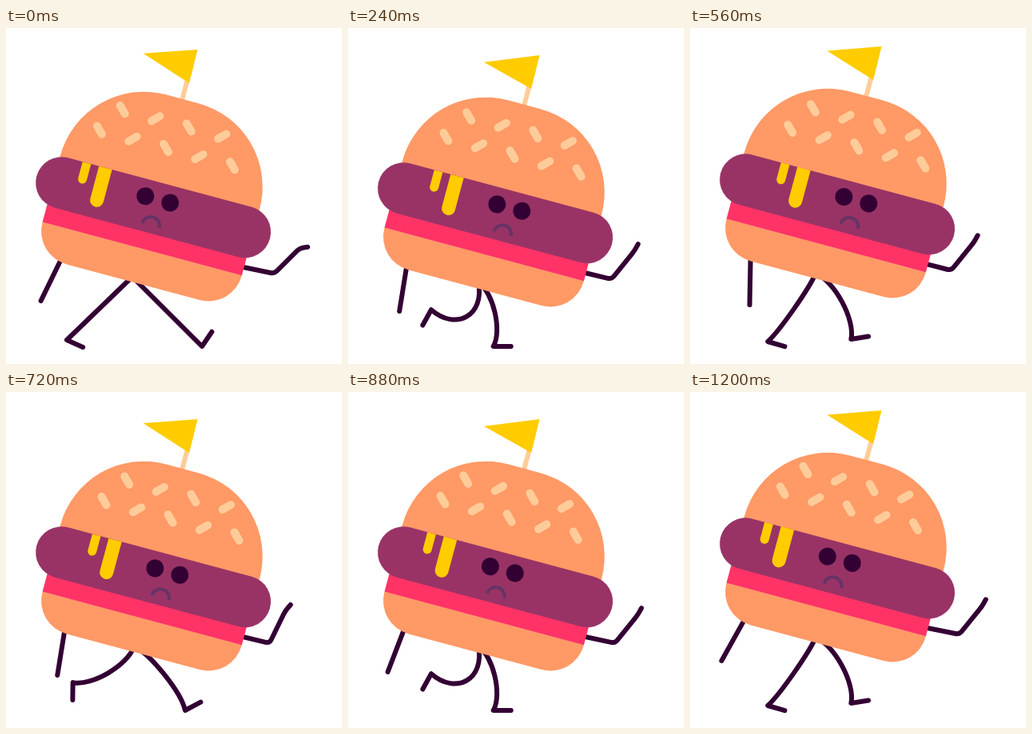
These frames come from a looping animation (420 by 420 pixels, 1.28 s). An HTML page:

```html
<!DOCTYPE html>
<html lang="en">
<head>
<meta charset="utf-8">
<title>Walking burger</title>
<style>
  html, body { margin: 0; width: 100%; height: 100%; overflow: hidden; background: #fff; }
  svg { display: block; width: 100vw; height: 100vh; }
  .limb { fill: none; stroke: #330033; stroke-width: 6; stroke-linecap: round; stroke-linejoin: round; }
</style>
</head>
<body>
<svg viewBox="0 0 420 420">
  <path id="legA" class="limb"/>
  <path id="legB" class="limb"/>
  <path id="armBack" class="limb"/>
  <path id="armFront" class="limb"/>
  <g id="body">
    <g transform="translate(184 224.5) rotate(15)">
      <path d="M0 -136V-185" stroke="#ffcc99" stroke-width="6"/>
      <path d="M-129 -30V-32.5A108 108 0 0 1 -21 -140.5H21A108 108 0 0 1 129 -32.5V-30Z" fill="#ff9966"/>
      <g id="seeds" stroke="#ffcc99" stroke-width="10" stroke-linecap="round"/>
      <path d="M-129 53H129V53.5A43 43 0 0 1 86 96.5H-86A43 43 0 0 1 -129 53.5Z" fill="#ff9966"/>
      <path d="M-129 25H129V53.2H-129Z" fill="#ff3366"/>
      <rect x="-151" y="-32.5" width="302" height="64.5" rx="32.25" fill="#993366"/>
      <g id="face">
        <path d="M-92 -32.5V-11.5a5.5 5.5 0 0 0 11 0V-32.5ZM-70.8 -32.5V9.4a8.5 8.5 0 0 0 17 0V-32.5Z" fill="#ffcc00"/>
        <circle cx="-5" cy="-11.3" r="11" fill="#330033"/>
        <circle cx="27" cy="-11.3" r="11" fill="#330033"/>
        <path d="M0 22.5a11 11 0 0 1 22 0" fill="none" stroke="#663366" stroke-width="4"/>
      </g>
    </g>
    <path id="flag" fill="#ffcc00"/>
  </g>
</svg>
<script>
const STEP = 80, COUNT = 16, STRIDE = 8;
const { PI, sin, cos, min, max } = Math;
const set = (id, name, value) => document.getElementById(id).setAttribute(name, value);
const polar = ([x, y], deg, len) => [x + len * cos(deg * PI / 180), y + len * sin(deg * PI / 180)];
const mix = (a, b, t) => a + (b - a) * t;

// Deep, sharp dip on each footfall and a softer rise after it
function bob(phase) {
  const s = sin(phase * PI / 4);
  return s > 0 ? 16 * s ** 2.4 : -6 * (-s) ** 1.2;
}

// Foot on the ground, sliding back from heel strike to push-off
function planted(u) {
  return {
    ankle: [245 - 21.1 * u, 398 - 2 * max(0, u - 4)],
    foot: min(0, 28 * u - 56) + 8 * max(0, u - 5),
    sag: 11.5 * sin(PI * (u / STRIDE) ** 0.7)
  };
}

// Foot in the air, lifted early and thrown forward late
function swinging(u) {
  const t = u / STRIDE;
  return {
    ankle: [
      76 + 169 * (0.35 * t + 0.65 * t ** 3),
      mix(390, 398, t) - 41 * sin(PI * t ** 0.65) ** 1.2
    ],
    foot: 24 - 80 * t + 125 * sin(PI * t ** 0.75),
    sag: 32 * sin(PI * t)
  };
}

// Rubber leg: a curve that sags to the front of the line from hip to ankle
function legPath([hx, hy], { ankle, foot, sag }) {
  const [ax, ay] = ankle, dx = ax - hx, dy = ay - hy;
  const k = sag * 4 / 3 / Math.hypot(dx, dy);
  const handle = t => [hx + dx * t + dy * k, hy + dy * t - dx * k];
  return `M${hx} ${hy}C${handle(0.2)} ${handle(0.8)} ${ankle}L${polar(ankle, foot, 22)}`;
}

// Polyline with softened corners
function softLine(pts, r) {
  const toward = ([x, y], [u, v]) => {
    const k = r / Math.hypot(u - x, v - y);
    return [mix(x, u, k), mix(y, v, k)];
  };
  let d = "M" + pts[0];
  for (let i = 1; i < pts.length - 1; i++) {
    d += `L${toward(pts[i], pts[i - 1])}Q${pts[i]} ${toward(pts[i], pts[i + 1])}`;
  }
  return d + "L" + pts[pts.length - 1];
}

function addSeeds() {
  const row = (x, y, n) => Array.from({ length: n }, (_, i) => {
    const s = i % 2 ? -4.2 : 4.2, cx = x + 43 * i;
    return `M${cx - 4.2} ${y - s}L${cx + 4.2} ${y + s}`;
  }).join("");
  document.getElementById("seeds").innerHTML =
    `<path d="${row(-65, -108.3, 4)}${row(-86.2, -76.2, 5)}"/>`;
}

function drawArms(phase, sway, dy) {
  const c = cos(phase * PI / 2), s = sin(phase * PI / 2);
  const elbow = [331.5 - 5.5 * sway, 307 + dy];
  const wrist = polar(elbow, -57.5 + 12.5 * c - 6.5 * s, 45);
  const hand = polar(wrist, -55 + 47 * c + 6 * s, 10);
  set("armFront", "d", softLine([[292, 298 + dy], elbow, wrist, hand], 5));
  set("armBack", "d",
    `M${71 + 5 * sway} ${293 + 1.5 * sway + dy}L${57 + 19 * sway} ${345 + 5.5 * sway + dy}`);
}

function draw(k) {
  const phase = k % STRIDE, dy = bob(phase);
  const sway = -cos((k + 2) * PI / 8);
  const flap = -7 * (-0.55) ** ((phase + 6) % STRIDE);
  const hip = [160 + 3 * cos((phase - 3) * PI / 4), 311 + dy];

  set("body", "transform", `translate(0 ${dy})`);
  set("seeds", "transform", `translate(${5.3 * sway} 0)`);
  set("face", "transform", `translate(${11.5 * sway} 0)`);
  set("flag", "d", `M239.5 27L229 69L${171.5 - 0.4 * flap} ${32 + flap}Z`);
  set("legA", "d", legPath(hip, swinging(phase)));
  set("legB", "d", legPath(hip, planted(phase)));
  drawArms(phase, sway, dy);
}

let shown = -1;
const start = performance.now();
function tick(now) {
  const k = Math.floor(max(0, now - start) / STEP) % COUNT;
  if (k !== shown) draw(shown = k);
  requestAnimationFrame(tick);
}
addSeeds();
draw(0);
requestAnimationFrame(tick);
</script>
</body>
</html>
```
